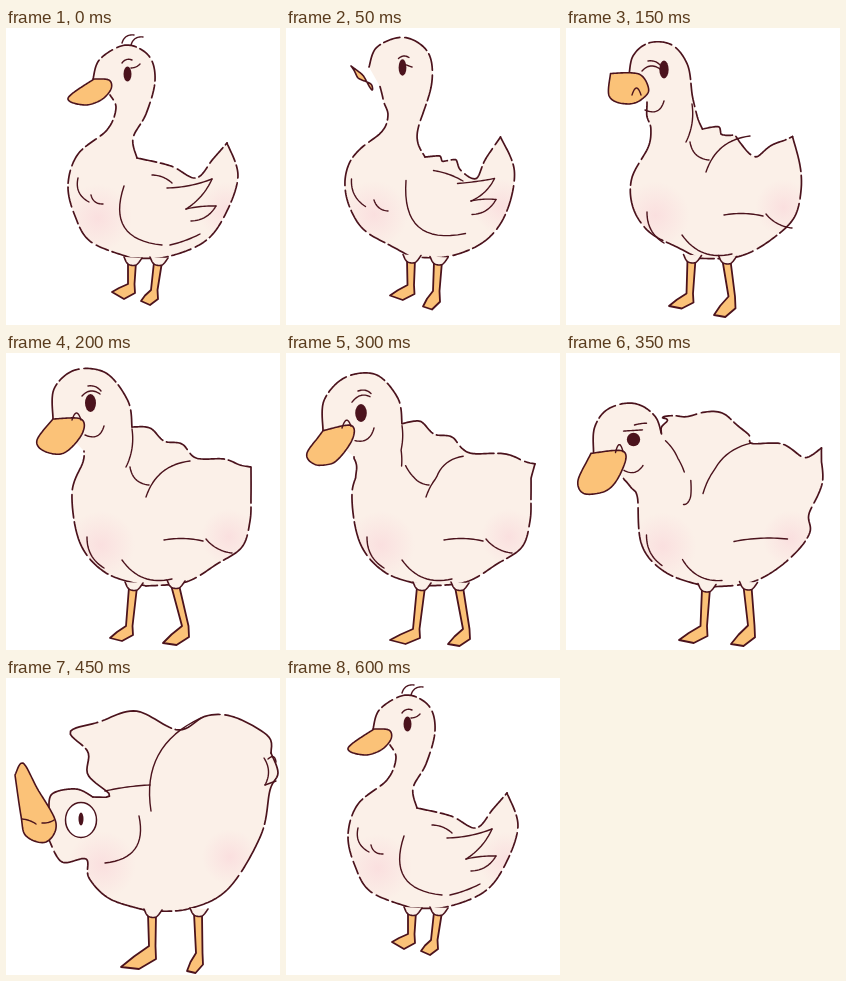
Animation, 274 px wide and 297 px high, one loop 0.65 s. Source, as an HTML page with a canvas:

```html
<!DOCTYPE html>
<html lang="en">
<head>
<meta charset="utf-8">
<title>Goose</title>
<style>
  html, body { margin: 0; width: 100%; height: 100%; overflow: hidden; background: #fff; }
  canvas { display: block; width: 274px; height: 297px; }
</style>
</head>
<body>
<canvas id="stage"></canvas>
<script>
const INK = '#4b131d', SKIN = '#fbf0e8', ORANGE = '#fbc278';
const SAMPLES = 100, STEP = 50, SHARED_LINES = 10;

const clamp = (v, lo, hi) => Math.min(hi, Math.max(lo, v));
const mix = (a, b, u) => a.map((v, i) => Array.isArray(v) ? mix(v, b[i], u) : v + (b[i] - v) * u);
const numbers = text => text.trim().split(/\s+/).map(Number);

function readPoints(text) {
  const n = numbers(text), out = [];
  for (let i = 0; i < n.length; i += 2) out.push([n[i], n[i + 1]]);
  return out;
}

// Catmull-Rom curve through the points.
function curve(p) {
  const out = [p[0]];
  for (let i = 0; i < p.length - 1; i++) {
    const a = p[i - 1] || p[i], b = p[i], c = p[i + 1], d = p[i + 2] || c;
    for (let k = 1; k <= 10; k++) {
      const u = k / 10;
      out.push([0, 1].map(j => b[j] + 0.5 * u * (c[j] - a[j] +
        u * (2 * a[j] - 5 * b[j] + 4 * c[j] - d[j] + u * (3 * (b[j] - c[j]) + d[j] - a[j])))));
    }
  }
  return out;
}

// Spread points evenly along a path, so any two paths can be blended.
function resample(p) {
  const dist = [0];
  for (let i = 1; i < p.length; i++)
    dist.push(dist[i - 1] + Math.hypot(p[i][0] - p[i - 1][0], p[i][1] - p[i - 1][1]));
  const total = dist[dist.length - 1], out = [];
  let i = 1;
  for (let k = 0; k <= SAMPLES; k++) {
    const at = total * k / SAMPLES;
    while (i < p.length - 1 && dist[i] < at) i++;
    out.push(mix(p[i - 1], p[i], (at - dist[i - 1]) / (dist[i] - dist[i - 1] || 1)));
  }
  return out;
}

// Line from one end to the other, bowed sideways by some pixels.
function bow(text) {
  const [x0, y0, x1, y1, bend] = numbers(text);
  const dx = x1 - x0, dy = y1 - y0, len = Math.hypot(dx, dy), out = [];
  for (let k = 0; k <= 16; k++) {
    const u = k / 16, off = 4 * bend * u * (1 - u) / len;
    out.push([x0 + dx * u - dy * off, y0 + dy * u + dx * off]);
  }
  return out;
}

// Leg with a webbed foot, from hip, ankle and toe.
function leg(text) {
  const [[hx, hy], [ax, ay], [tx, ty]] = readPoints(text);
  const low = Math.max(ty, ay + 13) + 2;
  return [[hx, hy - 2], [ax, ay], [(ax + tx) / 2 - 1, (ay + ty) / 2], [tx, ty],
          [(ax + tx) / 2 + 4, low], [ax + 7, (ay + low + 3) / 2], [ax + 6.5, ay], [hx + 8, hy - 2]];
}

const thigh = ([[x, y]]) => curve([[x - 4, y - 5], [x, y + 2], [x + 8, y + 3], [x + 14, y - 4]]);

// Body runs: head | back to tail tip | tail to belly | belly up to throat.
function pose({ body, beak, legs, lines, ...rest }) {
  let last = [];
  const runs = body.split('|').map(text => {
    const points = last.concat(readPoints(text));
    last = points.slice(-1);
    return resample(curve(points));
  });
  const bill = readPoints(beak);
  return {
    ...rest, body: runs, beak: resample(curve(bill.concat([bill[0]]))),
    legs: legs.split('|').map(leg), lines: lines.split('|').map(bow)
  };
}

const rest = pose({
  form: 'tall', dash: 20, eye: [121.5, 46, 4, 7.5], blush: [92, 190],
  body: `87 51 94 31 120 17 143 28 149 53 140 86 127 110 131 130
    |165 138 190 150 207 131 221 115
    |232 148 219 187 198 214 160 229 125 230
    |85 214 69 188 62 157 72 126 101 102 110 80 104 67`,
  beak: '88 51 62 70 78 77 95 72 105 61 103 52',
  legs: '122 236 122 256 106 264|148 236 145 262 135 273',
  lines: `118 158 156 217 22|72 150 83 174 5|85 167 97 176 3|161 160 206 151 2
    |206 151 180 181 -3|180 181 210 178 -1|210 178 185 193 -4|146 147 166 155 -2
    |125 40 134 36 1|116 35 126 32 -2|164 217 194 206 1|116 15 128 7 -3|125 17 137 9 -3`
});

const stretch = pose({
  form: 'tall', dash: 26, eye: [111.5, 33, 3.8, 9], blush: [84, 183],
  body: `79 27 88 7 115 1 140 19 143 53 133 91 137 115 147 128
    |163 123 160 132 174 125 172 139 188 152 193 131 208 103
    |225 138 222 181 200 212 165 228 125 228
    |102 210 70 190 56 160 63 127 98 100 99 78 85 66 84 50`,
  beak: '42 25 65 25 92 32 95 40 78 51 55 48',
  legs: '120 231 121 258 102 271|148 235 149 264 139 284',
  lines: `122 147 203 194 32|59 152 76 183 4|91 177 107 190 3|182 151 211 150 -1
    |211 150 190 165 -3|190 165 210 165 -1|210 165 187 180 -4|149 138 188 151 -1
    |116 34 118 42 -1|109 26 120 27 -2|44 37 92 45 10`
});

const duck = pose({
  form: 'low', dash: 36, eye: [84.5, 50, 5.5, 9], blush: [95, 192],
  body: `47 66 48 36 69 17 100 20 122 48 126 74
    |144 75 158 88 176 91 190 105 218 106 234 112 245 114
    |245 143 244 168 236 194 211 211 180 229 140 233
    |100 220 74 190 66 140 77 109 78 98`,
  beak: '47 66 75 66 76 81 58 100 38 98 31 87',
  legs: '123 236 120 273 104 285|165 234 176 273 157 290',
  lines: `140 144 184 108 -9|126 76 120 114 -3|124 114 143 132 5|158 187 197 188 -2
    |81 184 98 215 5|116 207 166 226 9|79 82 98 73 6|66 67 75 67 -7
    |76 43 94 41 -4|82 33 95 38 -2|200 186 226 200 3`
});

// The head dips forward while the tail swings up and out.
function dip([x, y]) {
  const pull = clamp((125 - y) / 25, 0, 1);
  const dx = -10 + 19 * clamp((x - 200) / 35, 0, 1);
  const dy = clamp(13 - (x - 40) * 0.19, -7, 13);
  return [x + dx * pull, y + dy * pull];
}

const lean = {
  ...duck, eye: [75, 60, 5.8, 9],
  body: duck.body.map(run => run.map(dip)),
  beak: duck.beak.map(dip),
  lines: duck.lines.map(line => line.map(dip)),
  legs: ['131 236 127 276 104 287', '169 236 177 276 162 291'].map(leg)
};

const crouch = pose({
  form: 'low', dash: 32, eye: [60, 113, 7.5, 4.5], blush: [98, 195],
  body: `18 122 22 91 49 77 66 80 75 91
    |69 79 75 66 57 60 74 50 92 47 117 36 145 34 164 47 180 64 176 80 214 81 241 102 262 79
    |268 115 243 147 250 168 230 206 190 230 142 235
    |100 220 79 198 77 158 58 152 47 147`,
  beak: '13 123 49 124 48 143 36 164 8 170 3 155',
  legs: '141 239 142 270 122 287|186 235 187 269 168 291',
  lines: `134 137 193 77 -12|83 103 121 125 -4|130 142 92 171 -11|178 190 246 184 -2
    |80 180 94 210 4|117 206 146 229 5|47 147 66 150 4|43 124 49 124 -8
    |49 107 69 110 4|65 106 76 100 1|115 118 158 108 -1`
});

const startled = pose({
  form: 'bent', dash: 75, eye: [75, 141, 2.5, 6.5], ring: [75, 142, 15.5, 17.5], blush: [96, 187],
  body: `43 134 46 116 70 111 87 119
    |104 117 82 97 82 74 64 54 93 44 130 33 172 52 200 38 228 39 262 58 265 75
    |272 95 264 112 255 157 222 211 182 231 142 233
    |104 221 83 200 80 181 56 184 43 162`,
  beak: '9 97 17 85 31 110 50 145 40 164 20 158 15 138',
  legs: '142 238 143 268 115 289|188 237 190 275 181 293',
  lines: `145 133 195 40 -20|133 138 99 185 -16|99 113 144 107 -1|16 141 30 146 -1
    |36 145 48 142 1|262 81 270 84 -4|258 80 259 107 -4|259 107 270 103 0`
});

const poses = [rest, stretch, duck, lean, crouch, startled];

function poseAt(stage) {
  const a = poses[Math.floor(stage)], u = stage % 1;
  if (!u) return a;
  const b = poses[Math.floor(stage) + 1], out = { dash: b.dash };
  for (const key of ['body', 'beak', 'legs', 'eye', 'blush']) out[key] = mix(a[key], b[key], u);
  out.lines = a.form === b.form ? mix(a.lines.slice(0, SHARED_LINES), b.lines, u) : b.lines;
  return out;
}

const canvas = document.getElementById('stage'), ctx = canvas.getContext('2d');
const scale = window.devicePixelRatio || 1;
canvas.width = 274 * scale;
canvas.height = 297 * scale;

function trace(points) {
  ctx.beginPath();
  for (const [x, y] of points) ctx.lineTo(x, y);
}

function shape(points, fill, width) {
  trace(points);
  if (fill) { ctx.fillStyle = fill; ctx.fill(); }
  if (width) { ctx.lineWidth = width; ctx.stroke(); }
}

function oval([x, y, rx, ry], fill) {
  ctx.beginPath();
  ctx.ellipse(x, y, rx, ry, 0, 0, 2 * Math.PI);
  ctx.fillStyle = fill;
  ctx.fill();
}

function glow(x, y, r) {
  const g = ctx.createRadialGradient(x, y, 0, x, y, r);
  g.addColorStop(0, 'rgba(250,218,220,.75)');
  g.addColorStop(1, 'rgba(250,218,220,0)');
  ctx.fillStyle = g;
  ctx.fillRect(x - r, y - r, 2 * r, 2 * r);
}

function draw(p) {
  ctx.setTransform(scale, 0, 0, scale, 0, 0);
  ctx.fillStyle = '#fff';
  ctx.fillRect(0, 0, 274, 297);
  ctx.strokeStyle = INK;
  ctx.lineCap = ctx.lineJoin = 'round';

  p.legs.forEach(l => shape(l, ORANGE, 1.8));

  const outline = p.body.flat();
  shape(outline, SKIN);
  ctx.save();
  trace(outline);
  ctx.clip();
  const [bx, by] = p.blush;
  glow(bx, by, 34);
  glow(bx + 128, by - 8, 28);
  ctx.restore();

  ctx.setLineDash([p.dash, 4, p.dash * 0.65, 5]);
  p.body.forEach(run => shape(run, null, 1.7));
  ctx.setLineDash([]);

  p.legs.forEach(l => shape(thigh(l), SKIN, 1.6));
  shape(p.beak, ORANGE, 1.6);
  if (p.ring) {
    oval(p.ring, '#fff');
    ctx.lineWidth = 1.5;
    ctx.stroke();
  }
  p.lines.forEach(line => shape(line, null, 1.4));
  oval(p.eye, INK);
}

// Whole stages are poses, halves lie between two; the last pose holds, then snaps back.
function stageAt(ms) {
  const step = Math.floor(ms / STEP) % 13;
  return step === 12 ? 0 : step > 8 ? 5 : step / 2;
}

const start = performance.now();
function tick() {
  draw(poseAt(stageAt(performance.now() - start)));
  requestAnimationFrame(tick);
}
tick();
</script>
</body>
</html>
```
